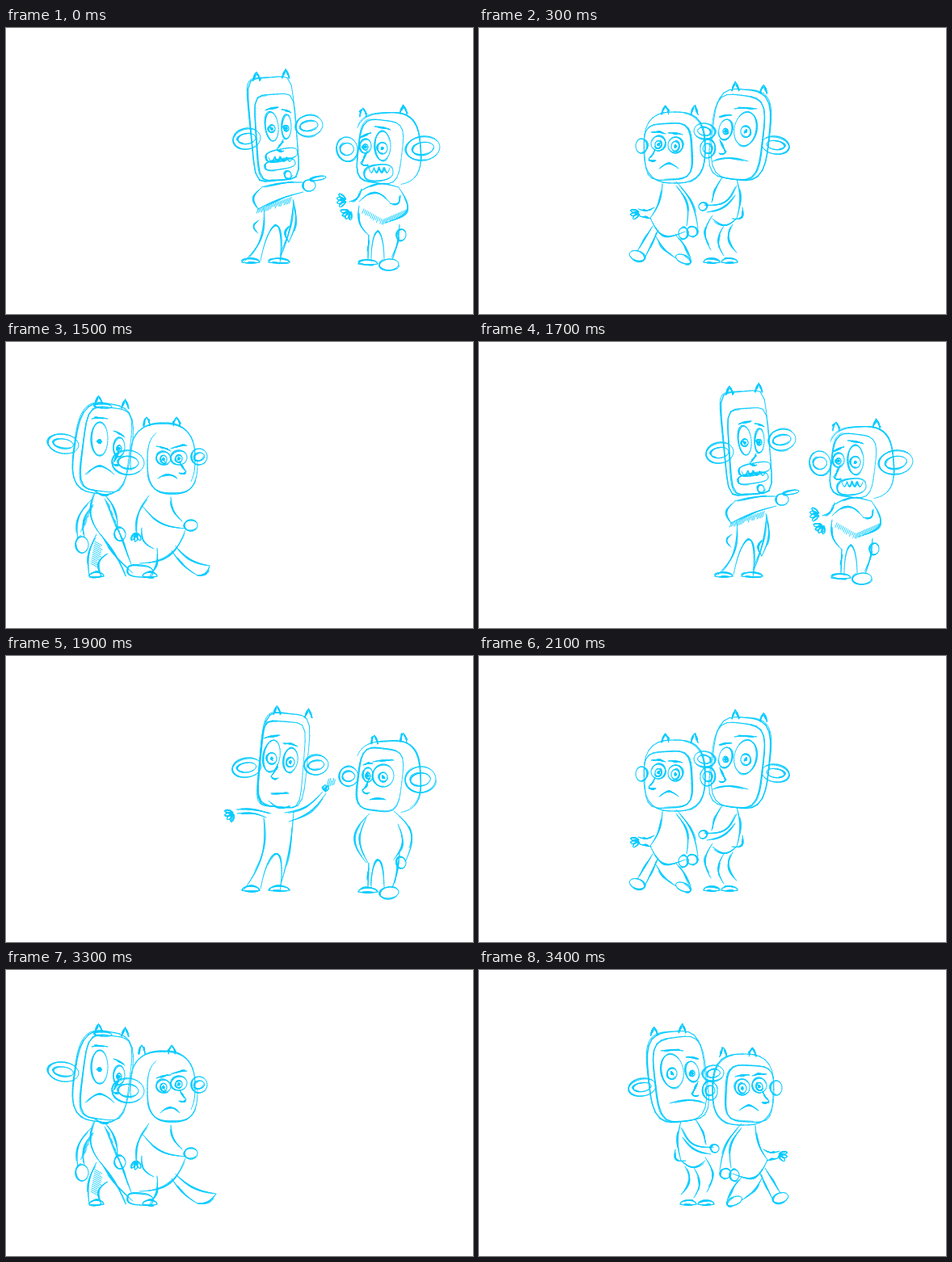
An HTML page with a canvas that plays this animation: 578 by 354 pixels, repeating every 3500 ms.

```html
<!DOCTYPE html>
<html lang="en">
<head>
<meta charset="utf-8">
<title>Two sketched figures</title>
<style>
html, body { margin: 0; width: 100%; height: 100%; overflow: hidden; background: #fff; }
canvas { display: block; }
</style>
</head>
<body>
<canvas id="stage" width="578" height="354"></canvas>
<script>
const ctx = document.getElementById('stage').getContext('2d');
const LOOP = 3500;
const { PI, sin, cos, abs, hypot } = Math;

let seed;
const random = () => (seed = seed * 16807 % 2147483647) / 2147483647;
const lerp = (a, b, t) => a + (b - a) * t;

// Pencil strokes: a line that swells in its middle, partly gone over a second time.
function trace(curve, from, to, weight, drift) {
  const steps = 36, phase = random() * 2 * PI;
  const point = i => {
    const t = lerp(from, to, i / steps), [x, y] = curve(t);
    return [x + drift * sin(phase + 5 * t), y + drift * cos(phase + 4 * t)];
  };
  for (let i = 0; i < steps; i++) {
    ctx.lineWidth = weight * (0.75 + 0.7 * sin(PI * (i + 0.5) / steps));
    ctx.beginPath();
    ctx.moveTo(...point(i));
    ctx.lineTo(...point(i + 1));
    ctx.stroke();
  }
}

function sketch(curve) {
  trace(curve, 0, 1, 1, 0);
  trace(curve, 0.35 * random(), 0.65 + 0.35 * random(), 0.7, 1.2);
}

// A line between two points; a positive bend bulges to the right of its direction.
function arc(x1, y1, x2, y2, bend = 0) {
  const dx = x2 - x1, dy = y2 - y1, length = hypot(dx, dy);
  sketch(t => {
    const push = bend * sin(PI * t) / length;
    return [x1 + dx * t - dy * push, y1 + dy * t + dx * push];
  });
}

// Superellipse, or the part of it between two turns (0 is right, 0.25 is down).
function blob(x, y, rx, ry, tilt = 0, power = 2, from = 0, to = 1) {
  sketch(t => {
    const a = 2 * PI * lerp(from, to, t);
    const r = (abs(cos(a)) ** power + abs(sin(a)) ** power) ** (-1 / power);
    const u = rx * r * cos(a), v = ry * r * sin(a);
    return [x + u * cos(tilt) - v * sin(tilt), y + u * sin(tilt) + v * cos(tilt)];
  });
}

function hatch(x1, y1, x2, y2, dx, dy) {
  const count = hypot(x2 - x1, y2 - y1) / 2.3;
  ctx.lineWidth = 0.9;
  ctx.beginPath();
  for (let i = 0; i <= count; i++) {
    const x = lerp(x1, x2, i / count), y = lerp(y1, y2, i / count), reach = 0.7 + 0.6 * random();
    ctx.moveTo(x, y);
    ctx.lineTo(x + dx * reach, y + dy * reach);
  }
  ctx.stroke();
}

// Parts of a figure
function skull(x, y, rx, ry, tilt, power, horns, from = 0, to = 1) {
  blob(x, y, rx, ry, tilt, power, from, to);
  for (const u of horns) {
    const hx = x + u * rx * cos(tilt) + ry * sin(tilt);
    const hy = y + u * rx * sin(tilt) - ry * cos(tilt);
    arc(hx - 4, hy + 3, hx, hy - 8, -1);
    arc(hx, hy - 8, hx + 4, hy + 3, -1);
  }
}

function ear(x, y, rx, ry, tilt = -0.15) {
  const ix = rx * 0.65, iy = ry * 0.5;
  blob(x, y, rx, ry, tilt);
  blob(x, y, ix, iy, tilt);
  for (let u = -0.7; u < 0.8; u += 2.8 / ix) {
    const h = iy * (1 - u * u) ** 0.5, top = y - h + u * ix * tilt;
    hatch(x + u * ix + 2, top, x + u * ix + 2, top, -3, 1.4 * h);
  }
}

function eye(x, y, rx, ry, pupil = 4, browSlope = 0, tilt = 0) {
  blob(x, y, rx, ry, tilt);
  blob(x, y + ry * 0.15, pupil, pupil * 1.2);
  blob(x, y + ry * 0.15, 1, 1.2);
  const browY = y - ry - 4;
  arc(x - rx, browY - browSlope, x + rx, browY + browSlope, -1);
}

function nose(x, y, side, height = 15) {
  arc(x, y, x + side * 8, y + height, side);
  arc(x + side * 8, y + height, x - side, y + height + 2, -2 * side);
}

const mouth = (x, y, width, frown) => arc(x - width, y, x + width, y, -frown);

function teeth(x, y, width, height) {
  sketch(t => [x + width * (2 * t - 1), y + height * abs(sin(4 * PI * t))]);
}

function hand(x, y, angle, fingers = 4, reach = 7) {
  for (let i = 0; i < fingers; i++) {
    const a = angle + (i - (fingers - 1) / 2) * 0.5;
    blob(x + reach * cos(a), y + reach * sin(a), reach * 0.65, 2, a);
  }
}

function foot(x, y, width) {
  blob(x, y, width, 5, 0, 2, 0.5, 1);
  arc(x - width, y, x + width, y, 1);
}

// Tall figure
function tallLegs(hip) {
  arc(319, hip, 295, 289, -10);
  arc(356, hip - 8, 340, 283, -3);
  blob(327, 290, 12, 46, 0.17, 2, 0.5, 1);
  foot(303, 290, 11);
  foot(338, 290, 13);
}

function tallPanic() {
  skull(331, 125, 28, 64, -0.09, 7, [-0.55, 0.75]);
  blob(335, 135, 25, 53, -0.07, 6);
  ear(298, 137, 17, 13);
  ear(375, 121, 17, 13);
  eye(329, 122, 8, 18, 4, -2, -0.1);
  eye(347, 122, 6, 15, 3, 2);
  nose(343, 138, -1, 12);
  blob(341, 157, 20, 7, -0.2, 3);
  blob(339, 169, 19, 6, -0.15, 3);
  teeth(340, 160, 15, 5);
  blob(349, 182, 4, 5);
  arc(316, 198, 313, 225, 8);
  arc(316, 197, 367, 191, -2);
  arc(312, 224, 368, 203, -2);
  blob(375, 195, 8, 7);
  blob(386, 186, 10, 2.5, -0.15);
  hatch(312, 224, 354, 209, -2, 6);
  arc(355, 212, 350, 265, -6);
  arc(352, 244, 350, 265, 5);
  arc(313, 238, 312, 254, 6);
  tallLegs(222);
}

function tallCalm() {
  skull(344, 129, 29, 58, 0.1, 5, [-0.5, 0.85]);
  blob(341, 134, 27, 53, 0.08, 6);
  ear(298, 138, 18, 12);
  ear(384, 135, 15, 12);
  eye(329, 124, 10, 20, 6, -2, 0.15);
  eye(352, 129, 9, 15, 5, 2, 0.15);
  nose(336, 134, -1);
  mouth(339, 170, 11, 0);
  arc(325, 179, 352, 186, 5);
  tallLegs(200);
}

function tallEntering() {
  skull(120, 132, 35, 56, 0.15, 3.2, [-0.4, 0.55]);
  blob(124, 133, 29, 52, 0.12, 4.5);
  blob(120, 79, 11, 3, 0.1);
  ear(71, 126, 19, 12, 0.15);
  eye(116, 120, 10, 21, 2);
  eye(140, 130, 7, 12, 3, 4);
  nose(140, 135, -1);
  mouth(116, 164, 18, 10);
  arc(108, 183, 133, 187, 4);
  arc(106, 195, 89, 245, 8);
  arc(107, 203, 97, 241, 6);
  blob(94, 251, 8, 10);
  arc(110, 187, 118, 240, 9);
  arc(118, 239, 157, 286, 3);
  arc(122, 189, 138, 230, -5);
  arc(138, 230, 155, 275);
  blob(141, 238, 7, 8);
  arc(116, 237, 148, 290, -3);
  arc(112, 238, 103, 290, 5);
  arc(126, 262, 118, 290, 8);
  foot(112, 290, 9);
  blob(166, 284, 16, 7, 0.1, 3);
  hatch(122, 194, 137, 232, 5, 7);
  hatch(104, 205, 92, 235, 4, -4);
  hatch(110, 247, 105, 275, 9, 5);
  ear(151, 149, 20, 15, 0.1);
}

function tallCrossing() {
  skull(245, 132, 35, 56, -0.1, 3.5, [-0.65, 0.35]);
  blob(250, 135, 32, 52, -0.12, 4);
  ear(202, 145, 17, 11);
  eye(239, 125, 14, 21, 6, 0, -0.2);
  eye(264, 126, 8, 13, 3, 1, -0.2);
  nose(271, 138, -1);
  mouth(258, 165, 22, 4);
  arc(250, 187, 250, 236, 4);
  arc(250, 195, 290, 219, 10);
  arc(252, 207, 287, 228, 5);
  arc(268, 185, 281, 216, -2);
  blob(292, 221, 5, 5);
  arc(243, 222, 256, 236, 8);
  arc(250, 236, 280, 236, 8);
  arc(255, 243, 250, 278, -8);
  arc(266, 245, 266, 282, -7);
  arc(280, 232, 282, 275, -8);
  foot(259, 290, 10);
  foot(281, 290, 10);
}

// Short figure
function shortHead(horn) {
  skull(473, 150, 40, 45, -0.07, 3, [horn, 0.55], 0.6, 1.2);
  blob(463, 153, 27, 39, 0.12, 4);
}

function shortLegs() {
  arc(449, 256, 448, 286);
  blob(460, 287, 8, 35, 0, 2, 0.5, 1);
  arc(487, 243, 478, 287, -2);
  foot(448, 292, 12);
  blob(474, 293, 12, 7, -0.1);
  blob(489, 256, 6, 7);
}

function shortPanic() {
  shortHead(-0.7);
  ear(422, 150, 13, 15);
  ear(516, 149, 21, 15);
  eye(445, 146, 7, 9, 3, -3);
  eye(466, 146, 10, 18, 6, 2);
  nose(447, 152, -1);
  blob(461, 179, 18, 10, -0.1, 2.5);
  teeth(462, 173, 13, 6);
  arc(437, 203, 485, 197, -7);
  arc(440, 199, 425, 215, -4);
  hand(421, 213, 3.1);
  hand(426, 226, 2.3);
  arc(437, 215, 475, 216, -12);
  arc(475, 217, 488, 207, 6);
  arc(485, 196, 470, 241, -20);
  arc(437, 220, 449, 257, 6);
  hatch(443, 224, 466, 237, -2, 5);
  hatch(467, 237, 495, 225, -2, 6);
  shortLegs();
}

function shortCalm() {
  shortHead(-0.35);
  ear(424, 149, 12, 12);
  ear(513, 153, 19, 16);
  eye(448, 147, 6, 9, 3, -1);
  eye(467, 148, 13, 14, 5, -1);
  nose(449, 152, -1);
  mouth(460, 178, 10, 2);
  arc(450, 195, 446, 256, 17);
  arc(446, 200, 448, 256, 9);
  arc(480, 192, 494, 255, -15);
  arc(485, 208, 480, 252, -8);
  shortLegs();
}

// A longer step carries the leading foot further and brings a deeper frown.
function shortEntering(step) {
  const toe = 252 + 8 * step;
  skull(194, 145, 40, 44, 0, 2.6, [-0.5 - 0.15 * step, 0.43 - 0.15 * step], 0.45, 1.1);
  blob(206, 148, 31, 40, 0, 2.8, 0, 0.65);
  ear(239, 142, 10, 10);
  eye(195, 144, 9, 8, 4, 3 - 5 * step);
  eye(214, 143 - 3 * step, 10, 9, 4, -2);
  nose(215, 148, 1, 12);
  mouth(200 + 3 * step, 169 + 8 * step, 12, 5 + 2 * step);
  arc(177, 190, 162, 240, 6);
  arc(168, 202, 222, 231, 8);
  arc(204, 192, 218, 222, 4);
  blob(229, 227, 8, 7);
  arc(222, 233, 165, 274, -14);
  hand(161, 235, 1.6, 3);
  arc(168, 230, 183, 256, 6);
  arc(205, 258, 237, 289, 3);
  arc(210, 253, toe, 277, 5);
  arc(237, 289, toe, 277, 4);
  arc(187, 255, 178, 290, -4);
  foot(178, 290, 9);
}

function shortCrossing() {
  skull(327, 148, 38, 44, 0, 2.8, [-0.65, 0.3]);
  blob(335, 153, 29, 35, 0.05, 4);
  ear(290, 128, 13, 10);
  ear(286, 149, 9, 12);
  blob(368, 146, 7, 9);
  eye(326, 145, 9, 10, 5, -1);
  eye(347, 143, 9, 9, 4, -1);
  nose(351, 150, 1, 12);
  mouth(334, 174, 12, 6);
  arc(325, 190, 298, 248, 6);
  arc(325, 195, 312, 245, 7);
  arc(342, 192, 357, 235, 4);
  arc(352, 222, 372, 224, 3);
  arc(356, 236, 370, 233);
  hand(370, 228, 0.3, 3);
  arc(357, 235, 314, 252, -14);
  blob(305, 252, 7, 6);
  blob(316, 254, 6, 7);
  arc(347, 250, 363, 283);
  arc(354, 245, 373, 276);
  blob(373, 282, 10, 6, -0.3);
  arc(325, 257, 307, 285, 2);
  arc(350, 258, 325, 285, -3);
  blob(316, 286, 10, 5, -0.4);
}

// Poses
function panic() {
  tallPanic();
  shortPanic();
}

function wait() {
  tallCalm();
  arc(322, 198, 308, 250, 8);
  arc(326, 204, 314, 248, 6);
  arc(354, 196, 362, 250, -6);
  hand(310, 250, 1.6, 3, 5);
  hand(360, 250, 1.6, 3, 5);
  shortCalm();
}

function shrug() {
  tallCalm();
  arc(328, 195, 285, 190, 2);
  arc(322, 200, 286, 195, 3);
  hand(282, 194, 2.6);
  arc(345, 194, 392, 168, 6);
  arc(350, 205, 396, 170, 6);
  hand(394, 168, -1.2, 2, 5);
  hatch(397, 162, 407, 159, 2, -8);
  shortCalm();
}

const entering = step => () => {
  tallEntering();
  shortEntering(step);
};
const [glancing, frowning] = [entering(0), entering(1)];

function crossing() {
  tallCrossing();
  shortCrossing();
}

// Walking back: the same drawing facing left.
const mirrored = (pose, span) => () => {
  ctx.save();
  ctx.transform(-1, 0, 0, 1, span, 0);
  pose();
  ctx.restore();
};
const crossingBack = mirrored(crossing, 569);
const leaving = mirrored(glancing, 311);
const empty = () => {};

const schedule = [
  [0, panic], [100, wait], [300, crossingBack], [400, leaving], [500, empty],
  [1500, glancing], [1600, crossing], [1700, panic], [1800, wait], [1900, shrug],
  [2100, crossingBack], [2200, leaving], [2300, empty],
  [3300, frowning], [3400, crossing]
];

const start = performance.now();
let shown;

function frame() {
  const time = (performance.now() - start) % LOOP;
  const pose = schedule.filter(([from]) => from <= time).pop()[1];
  if (pose !== shown) {
    ctx.clearRect(0, 0, 578, 354);
    ctx.strokeStyle = '#08cbff';
    ctx.lineCap = 'round';
    seed = 7;
    pose();
    shown = pose;
  }
  requestAnimationFrame(frame);
}
frame();
</script>
</body>
</html>
```
